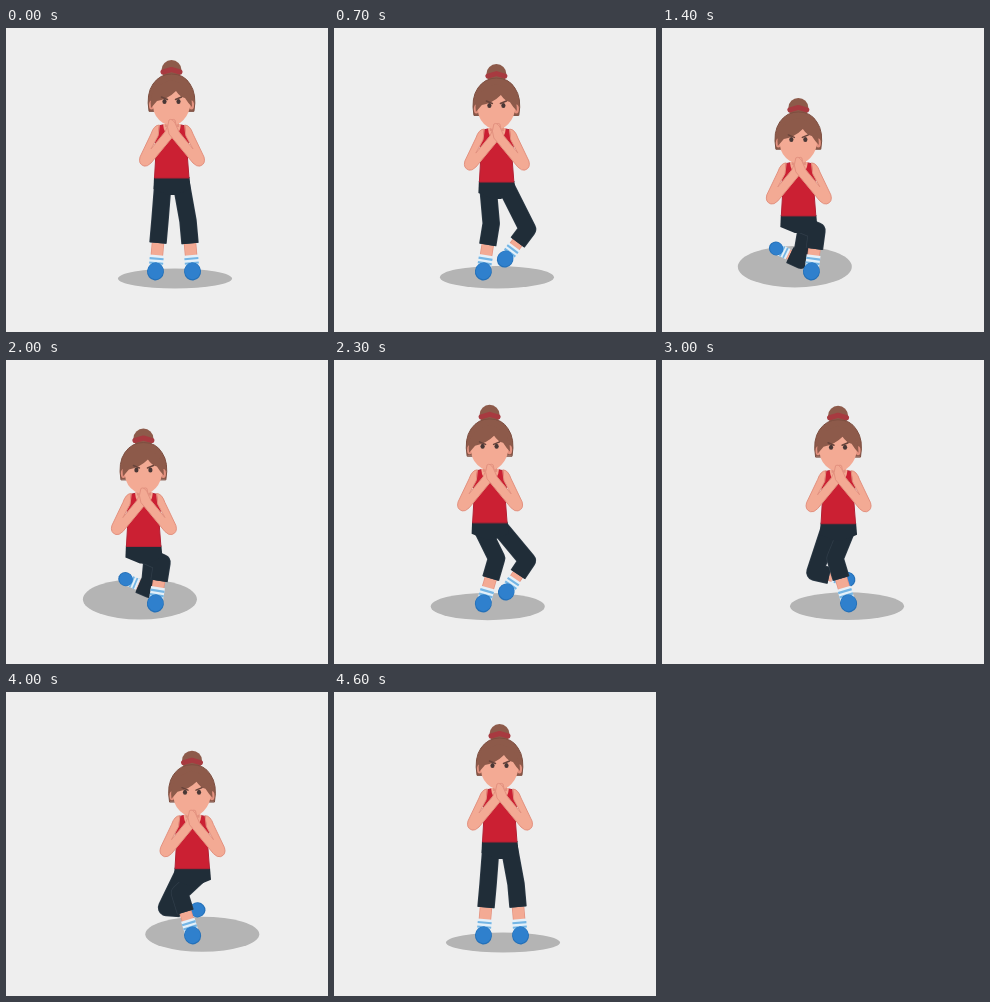
Write an HTML page with a canvas that moves like this. It is 322 px wide and 304 px high and loops after 4700 ms.

```html
<!DOCTYPE html>
<html lang="en">
<head>
<meta charset="utf-8">
<title>Curtsy lunge</title>
<style>
html, body { margin: 0; width: 100%; height: 100%; overflow: hidden; background: #eee; }
canvas { display: block; width: 322px; height: 304px; }
</style>
</head>
<body>
<canvas id="stage" width="322" height="304"></canvas>
<script>
const ctx = document.getElementById('stage').getContext('2d');
const LOOP = 4700, STEP = 100, MID = 168;
const SKIN = '#f3aa94', EDGE = '#e3917f', HAIR = '#8d5a4a', HAIR_DARK = '#7d4e40';
const RED = '#cb2033', RED_DARK = '#b32033', PANTS = '#202d38', PANTS_EDGE = '#303d49';
const BLUE = '#2f80cd', BLUE_DARK = '#2470b8';

// side is the direction of travel: -1 left, 1 right
const REPS = [
  { side: -1, down: 500, up: 1900, end: 2550 },
  { side: 1, down: 2600, up: 3700, end: 4500 }
];
const DESCENT = 1000;

const mix = (a, b, k) => a + (b - a) * k;
const between = (p, q, k) => [mix(p[0], q[0], k), mix(p[1], q[1], k)];

function smooth(from, to, t) {
  const k = Math.min(1, Math.max(0, (t - from) / (to - from)));
  return k * k * (3 - 2 * k);
}

function line(points, width, color, cap = 'round') {
  ctx.lineWidth = width;
  ctx.strokeStyle = color;
  ctx.lineCap = cap;
  ctx.lineJoin = 'round';
  ctx.beginPath();
  points.forEach(p => ctx.lineTo(p[0], p[1]));
  ctx.stroke();
}

function oval(x, y, rx, ry, color) {
  ctx.fillStyle = color;
  ctx.beginPath();
  ctx.ellipse(x, y, rx, ry, 0, 0, Math.PI * 2);
  ctx.fill();
}

function shape(d, fill, edge) {
  const path = new Path2D(d);
  ctx.fillStyle = fill;
  ctx.fill(path);
  if (edge) {
    ctx.lineWidth = 1;
    ctx.strokeStyle = edge;
    ctx.stroke(path);
  }
}

function leg(hip, knee, foot, size = 1) {
  const hem = between(knee, foot, 0.45);
  line([hem, foot], 12.5 * size, EDGE, 'butt');
  line([hem, foot], 11 * size, SKIN, 'butt');

  ctx.save();
  ctx.translate(foot[0], foot[1]);
  ctx.rotate(Math.atan2(foot[1] - knee[1], foot[0] - knee[0]) - Math.PI / 2);
  ctx.scale(size, size);
  ctx.fillStyle = '#e4f0f9';
  ctx.fillRect(-7, -16, 14, 13);
  ctx.fillStyle = '#74b5e4';
  ctx.fillRect(-7, -13.5, 14, 2.2);
  ctx.fillRect(-7, -9, 14, 2.2);
  oval(0, 0.5, 8.5, 9, BLUE_DARK);
  oval(0, 0, 7.7, 8.2, BLUE);
  ctx.restore();

  line([hip, knee, hem], 17.5, PANTS_EDGE, 'butt');
  line([hip, knee, hem], 16, PANTS, 'butt');
}

function arm(side) {
  ctx.save();
  ctx.translate(166, 0);
  ctx.scale(side, 1);
  shape('M13 97 Q18 97 21 106 L32 129 Q34 136 28 138 Q25 139 21 135 L-3 106 ' +
    'Q-6 99 -3 92 Q0 90 3 95 L7 104 L21 121 L14 108 Z', SKIN, EDGE);
  ctx.restore();
}

function torso() {
  shape('M152 98 Q165 94 180 98 L183 110 L181 124 L183 150 H148.5 L150 124 L149 110 Z', RED, RED_DARK);
  shape('M157 96 Q158 108 166 109 Q174 108 175 96 Z', SKIN);
  shape('M159 88 H173 V99 H159 Z', EDGE);
}

function head(blink) {
  oval(165.5, 42, 10, 10, HAIR);
  line([[157, 44], [165.5, 41.5], [174, 44]], 5, '#a83a40');
  shape('M143 83 Q140 66 147 56 Q154 46 165.5 46 Q178 46 184 56 Q191 66 188 83 Z', HAIR, HAIR_DARK);
  oval(145.5, 77, 2.5, 4.5, EDGE);
  oval(185.5, 77, 2.5, 4.5, EDGE);
  shape('M147 68 Q166 54 184 68 V79 Q182 89 174 95 Q166 100 157 95 Q148 89 147 79 Z', SKIN);
  shape('M145 80 Q142 58 165 52 Q186 56 186 79 Q182 75 179 70 Q174 69 170 63 Q162 71 151 73 Z', HAIR);
  for (const side of [-1, 1]) {
    const x = 165.5 + side * 7;
    line([[x + side * 3, 69], [x - side * 3, 71.5]], 1.5, '#68443b');
    if (blink) line([[x - 3, 73.5], [x + 3, 73.5]], 1.2, '#593d38');
    else oval(x, 73.5, 2.1, 2.5, '#493836');
  }
}

function draw(t) {
  const { side, down, up, end } = REPS[t < REPS[1].down ? 0 : 1];
  const rising = t > up;
  const depth = rising ? 1 - smooth(up, end, t) : smooth(down, down + DESCENT, t);
  const bend = Math.sin(Math.PI * depth);
  // the free foot leads on the way down and returns first on the way up
  const cross = depth ** (rising ? 1.5 : 0.7);
  const arc = Math.sin(Math.PI * cross);
  const at = (u, y) => [MID + side * u, y];

  const x = side * 30 * depth, y = 39 * depth;
  const hip = u => [166 + x + side * u, 154 + y];

  ctx.fillStyle = '#eee';
  ctx.fillRect(0, 0, 322, 304);
  const ry = 10 + 11 * depth;
  oval(169 + side * 37 * depth ** 0.8, 261.5 - 1.1 * ry, 57, ry, '#b4b4b4');

  leg(hip(-9),
    at(-14 + 44 * cross - 43 * (1 - cross) * arc, 193 + 40 * cross),
    at(mix(-18.5, 55, cross), 243 - 22 * cross - 13 * arc),
    1 - 0.2 * cross);
  leg(hip(9),
    at(14 - 10 * bend, 192 + 11 * Math.sqrt(depth)),
    at(18.5, 243));

  ctx.save();
  ctx.translate(x, y);
  shape('M148 149 H183.5 L184.5 161 L170 167 H162 L147.5 161 Z', PANTS);
  torso();
  head(t >= 1700 && t < 1800);
  arm(-1);
  arm(1);
  ctx.restore();
}

const start = performance.now();
function tick() {
  const t = (performance.now() - start) % LOOP;
  draw(Math.floor(t / STEP) * STEP);
  requestAnimationFrame(tick);
}
tick();
</script>
</body>
</html>
```
